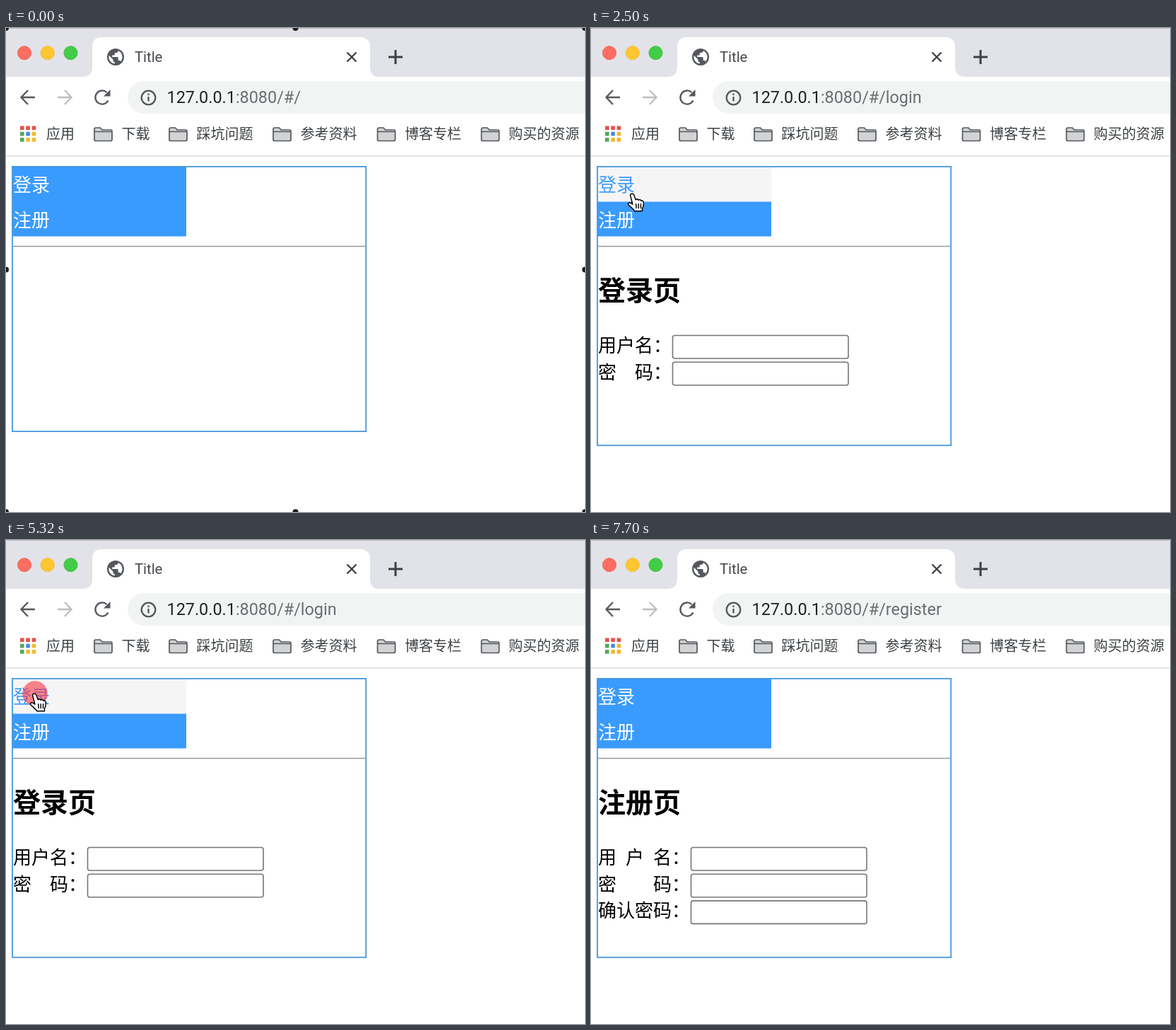
Animation, 819 px wide and 684 px high, one loop 8000 ms. Source, as an HTML page:

```html
<!DOCTYPE html>
<html lang="zh-CN">
<head>
<meta charset="utf-8">
<title>Title</title>
<style>
  html, body { margin: 0; width: 100%; height: 100%; overflow: hidden; background: #fff; }
  svg { display: block; width: 819px; height: 684px; }
  text { font-family: "Noto Sans CJK SC", "Noto Sans CJK JP", "Noto Sans CJK", sans-serif; white-space: pre; }
  .ui { font-family: Roboto, Inter, sans-serif; }
  .line { fill: none; stroke: #54575b; stroke-width: 2.3; }
  .mark text { font-size: 20px; fill: #3c4043; }
  .row text, .form text { font-size: 26px; font-weight: 500; }
  .form .head { font-size: 39px; font-weight: 700; }
  .form rect { fill: #fff; stroke: #767676; stroke-width: 1.6; }
</style>
</head>
<body>
<svg viewBox="0 0 819 684">
  <rect width="819" height="684" fill="#fff"/>
  <rect width="819" height="69" fill="#e2e3e9"/>
  <rect width="819" height="1" fill="#bfc0c4"/>
  <g stroke-width=".8">
    <circle cx="26" cy="35.200" r="9.600" fill="#fb6e61" stroke="#ee6257"/>
    <circle cx="58.800" cy="35.200" r="9.600" fill="#fec630" stroke="#efb72c"/>
    <circle cx="91.500" cy="35.200" r="9.600" fill="#43cc47" stroke="#3bbf40"/>
  </g>
  <path fill="#fff" d="M108 69Q122 69 122 55V27Q122 13 136 13H501Q515 13 515 27V55Q515 69 529 69Z"/>
  <circle cx="155" cy="41" r="12" fill="#54575b"/>
  <path fill="#fff" transform="translate(140.600 26.600) scale(1.2)" d="M11 19.900C7 19.400 4 16.100 4 12Q4 11 4.200 10.200L9 15V16Q9 18 11 18ZM17.900 17.400Q17.400 16 16 16H15V13Q15 12 14 12H8V10H10Q11 10 11 9V7H13Q15 7 15 5V4.600C18 5.800 20 8.700 20 12Q20 15.100 17.900 17.400Z"/>
  <text class="ui" x="182" y="48" font-size="20.3" fill="#45484c">Title</text>
  <path class="line" style="stroke:#3c4043" d="M482.500 34.500l13 13m0 -13l-13 13"/>
  <path class="line" style="stroke:#3c4043;stroke-width:3" d="M541 41h20M551 31v20"/>

  <path class="line" d="M41 98H22M31 88L21.500 98L31 108"/>
  <path class="line" style="stroke:#bcbec1" d="M73 98H92M83 88L92.500 98L83 108"/>
  <path class="line" d="M144.500 102.500A9.600 9.600 0 1 1 142.500 91"/>
  <path fill="#54575b" d="M147.500 87V96.500H138Z"/>
  <path fill="#f2f4f4" d="M819 75H195A23 23 0 0 0 195 121H819Z"/>
  <circle class="line" cx="201.500" cy="98.500" r="9.800"/>
  <path class="line" d="M201.500 97v6.500M201.500 92.500v2.400"/>
  <text class="ui" x="227.500" y="106" font-size="23.400" fill="#202124">127.0.0.1<tspan fill="#6a6d71" id="url"></tspan></text>
  <g id="apps"></g>
  <g id="marks" class="mark"></g>
  <rect y="180" width="819" height="1.500" fill="#dcdddf"/>

  <g id="rows" class="row"></g>
  <rect x="10" y="307.800" width="498" height="1.500" fill="#969696"/>
  <rect x="10" y="309.300" width="498" height=".8" fill="#e4e4e4"/>
  <rect id="panel" x="9" y="195.900" width="500.200" fill="none" stroke="#4598de" stroke-width="1.800"/>
  <g id="login" class="form"></g>
  <g id="register" class="form"></g>

  <circle id="press" fill="#fa3a48" opacity=".62"/>
  <g id="cursor">
    <g id="hand" transform="translate(-.6 -.4) scale(.97)" stroke="#000" stroke-width="1.500" stroke-linejoin="round" stroke-linecap="round">
      <path fill="#fff" d="M-3 2.500C-2.500 0 1.500 0 2.500 2.500L5 9.500C6 8 8 8 9 10C10 8.800 12 8.800 13 11C14.500 10 16 11 16.300 13.500C17 17 16 20 14.500 22.500V26H3.500C2 23 -2 20.500 -5.500 17C-7 14.500 -5 13 -2.500 14L.5 16Z"/>
      <path fill="none" d="M5.500 15.500l.4 6M9 15.500l.2 6M12.500 15.500v6"/>
    </g>
    <path id="arrow" fill="#000" stroke="#fff" stroke-width="1.500" d="M.5 0V22L5.500 17.500L9 25.500L12.500 24L9.200 16.300H16Z"/>
  </g>
  <g id="handles" fill="#1c1c1e"></g>
</svg>
<script>
const $ = id => document.getElementById(id);
const show = (id, on) => $(id).setAttribute('display', on ? 'inline' : 'none');
const BLUE = '#3a9bff', PALE = '#f5f5f5';

// Static parts
const red = '#e5534b', green = '#57a55a', blue = '#4a86e8', gold = '#f2b82e';
$('apps').innerHTML = [red, red, red, green, blue, gold, green, gold, gold].map((c, i) =>
  `<rect x="${20 + i % 3 * 8.3}" y="${138.5 + Math.floor(i / 3) * 8.3}" width="5.6" height="5.6" fill="${c}"/>`).join('');

const folder = x => `<path transform="translate(${x} 140)" fill="#d2d3d5" stroke="#55585c" stroke-width="1.7"
  d="M1 3Q1 1 3 1H9.5L12 4H24Q26 4 26 6V17.5Q26 19.5 24 19.5H3Q1 19.5 1 17.5ZM1 6.5H26"/>`;
$('marks').innerHTML = '<text x="57" y="157">应用</text>' +
  [[124, '下载'], [230, '踩坑问题'], [377, '参考资料'], [524.5, '博客专栏'], [671.5, '购买的资源']]
    .map(([x, name]) => folder(x) + `<text x="${x + 39.5}" y="157">${name}</text>`).join('');

// The first row reaches under the second, so no seam shows
const rows = [{ y: 196, h: 50, name: '登录' }, { y: 245.5, h: 49, name: '注册' }];
$('rows').innerHTML = rows.map(r => `<rect x="9" y="${r.y}" width="246" height="${r.h}"/>`).join('') +
  rows.map(r => `<text x="10" y="${r.y + 35}">${r.name}</text>`).join('');

function form(id, head, inputX, labels) {
  $(id).innerHTML = `<text class="head" x="10" y="385">${head}</text>` + labels.map(([text, x], i) =>
    `<text x="${x}" y="${458 + i * 37.7}">${text}</text>` +
    `<rect x="${inputX}" y="${434.5 + i * 37.7}" width="248.5" height="32.5" rx="3"/>`).join('');
}
form('login', '登录页', 115.5, [['用户名：', 10], ['密　码：', 10]]);
form('register', '注册页', 141.5, [['用户名：', '10 49 88 114'], ['密　　码：', 10], ['确认密码：', 10]]);

$('handles').innerHTML = [0, 409.5, 819].flatMap(x => [0, 341.5, 684].map(y => [x, y]))
  .filter(([x, y]) => x !== 409.5 || y !== 341.5)
  .map(([x, y]) => `<circle cx="${x}" cy="${y}" r="4"/>`).join('');

// Pointer stops: time, x, y
const stops = [
  [480, 200, 656], [1280, 56, 234], [1560, 56, 234], [1600, 57, 229], [1780, 57, 229],
  [1800, 56.5, 227.5], [2120, 56.5, 227.5], [2300, 57, 228], [2500, 59, 234],
  [2880, 27, 285], [3140, 27, 285], [3240, 31, 277], [4200, 31, 277.5], [4860, 43, 218],
  [5140, 43, 218], [5320, 41, 217], [5560, 41, 217], [6060, 46, 272], [6720, 46, 272],
  [7080, 724, 331], [7500, 724, 331], [7690, 524, 607]
];
const clicks = [
  { down: 1780, up: 2120, page: 'login' }, { down: 3360, up: 3600, page: 'register' },
  { down: 4880, up: 5140, page: 'login' }, { down: 6100, up: 6334, page: 'register' }
];
const clamp = v => Math.max(0, Math.min(1, v));

function pointer(t) {
  if (t < 480 || t >= 7700) return null;
  const i = stops.findIndex(s => s[0] > t);
  if (i < 0) return stops[stops.length - 1].slice(1);
  const [t0, x0, y0] = stops[i - 1], [t1, x1, y1] = stops[i];
  const k = (t - t0) / (t1 - t0), e = k * k * (3 - 2 * k);
  return [x0 + (x1 - x0) * e, y0 + (y1 - y0) * e];
}

function radius(t) {
  const c = clicks.find(c => t >= c.down && t < c.up + 320);
  if (!c) return 0;
  return 41 * Math.min(clamp((t - c.down) / 140), clamp(1 - (t - c.up) / 320));
}

function draw(t) {
  const page = clicks.filter(c => t >= c.up).map(c => c.page).pop() || '';
  $('url').textContent = ':8080/#/' + page;
  show('login', page === 'login');
  show('register', page === 'register');
  $('panel').setAttribute('height', page ? 393.9 : 374.2);
  show('handles', t < 80);

  const p = pointer(t);
  const over = p && p[0] > 9 && p[0] < 255 ? rows.findIndex(r => p[1] >= r.y && p[1] < r.y + 49.3) : -1;
  const parts = $('rows').children;
  rows.forEach((r, i) => {
    parts[i].setAttribute('fill', i === over ? PALE : BLUE);
    parts[i + rows.length].setAttribute('fill', i === over ? BLUE : '#fff');
  });

  show('cursor', !!p);
  show('hand', over >= 0);
  show('arrow', over < 0);
  const press = $('press');
  press.setAttribute('r', p ? radius(t) : 0);
  if (!p) return;
  $('cursor').setAttribute('transform', `translate(${p[0]} ${p[1]})`);
  press.setAttribute('cx', p[0]);
  press.setAttribute('cy', p[1]);
}

const start = performance.now();
function tick() {
  draw((performance.now() - start) % 8000);
  requestAnimationFrame(tick);
}
draw(0);
requestAnimationFrame(tick);
</script>
</body>
</html>
```
